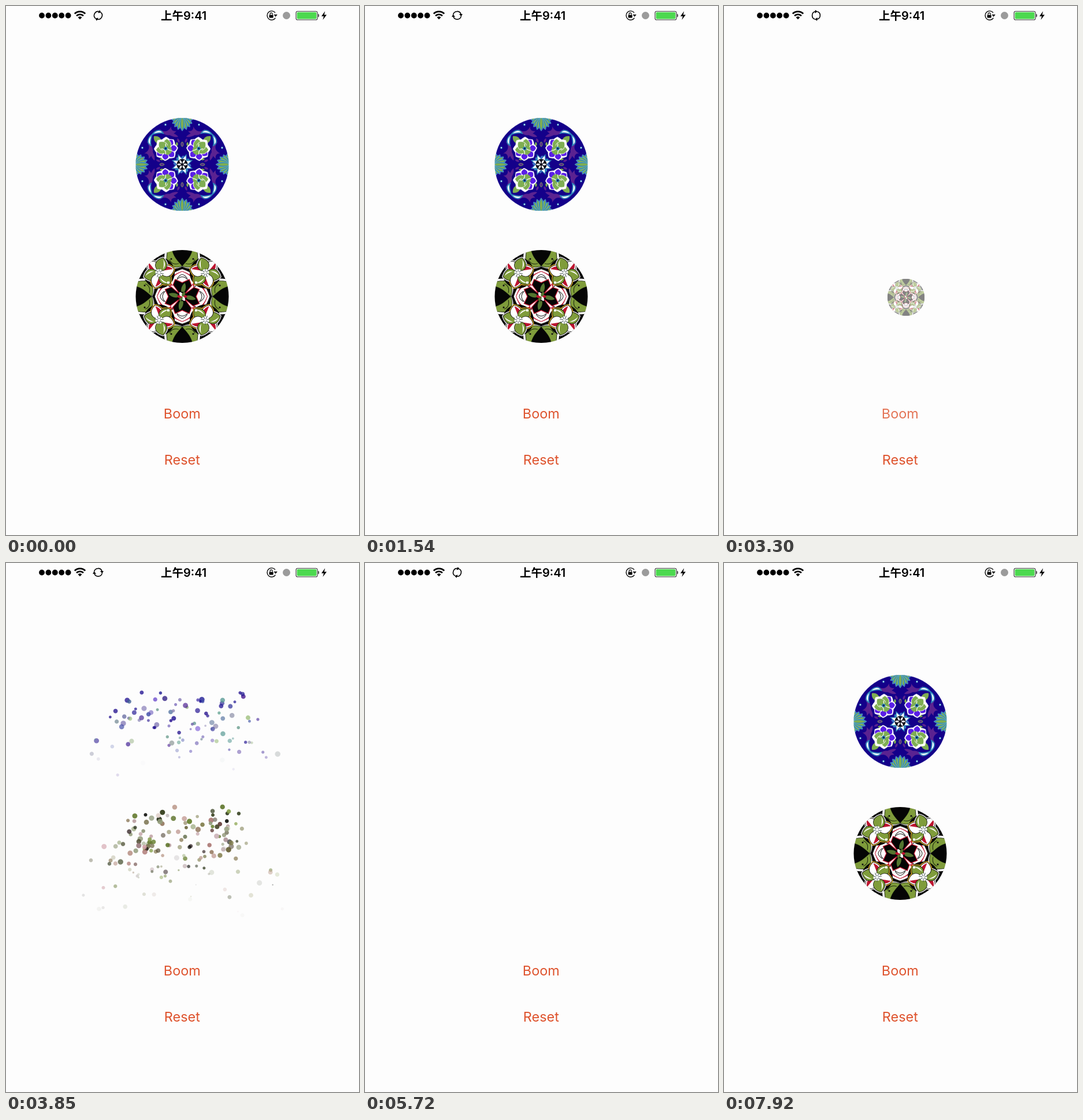
An HTML page with a canvas for the animation above (8 s loop, 611 px wide and 917 px high).

```html
<!DOCTYPE html>
<html lang="zh">
<head>
<meta charset="utf-8">
<title>Boom</title>
<style>
html, body { margin: 0; width: 100%; height: 100%; overflow: hidden; background: #fdfdfd; }
canvas, svg { position: absolute; left: 0; top: 0; width: 611px; height: 917px; }
.btn { font: 400 23.4px Inter, "Open Sans", sans-serif; fill: #de532d; text-anchor: middle; }
.time { font: 600 20px Inter, sans-serif; }
.cjk { font: 700 19.5px "Noto Sans CJK SC", "Noto Sans CJK", "Noto Sans CJK JP", sans-serif; }
</style>
</head>
<body>
<canvas id="stage" width="1222" height="1834"></canvas>
<svg viewBox="0 0 611 917">
  <g id="dots"></g>
  <g fill="none" stroke="#000" stroke-width="2.7">
    <path d="M118.8 13.4a13.2 13.2 0 0 1 18.4 0"/>
    <path d="M122 17a8.6 8.6 0 0 1 12 0"/>
  </g>
  <path d="M128 23.2l-3.4-3.5a4.9 4.9 0 0 1 6.8 0z"/>
  <g id="sync">
    <g id="arrow">
      <path d="M-6.9 -1.4A7 7 0 0 1 6.6 -2" fill="none" stroke="#000" stroke-width="1.6"/>
      <path d="M3.400 -2.400h6l-2.400 4.200z"/>
    </g>
    <use href="#arrow" transform="rotate(180)"/>
  </g>
  <text class="cjk" x="268" y="23.6">上午</text>
  <text class="time" x="307" y="23.6">9:41</text>
  <path d="M466 11.6a7.8 7.8 0 1 0 .4 9" fill="none" stroke="#000" stroke-width="1.4"/>
  <path d="M463.400 14.800h6.400l-3.200 4z"/>
  <rect x="455.600" y="15.4" width="7" height="5.200" rx=".8"/>
  <path d="M457.100 15.6v-1.8a2 2 0 0 1 4 0v1.8" fill="none" stroke="#000" stroke-width="1.2"/>
  <circle cx="485.5" cy="16.5" r="6.5" fill="#9b9b9b"/>
  <rect x="502" y="9.2" width="37" height="14.8" rx="2.8" fill="#fff" stroke="#333" stroke-width="1.1"/>
  <rect x="503.6" y="10.8" width="33.8" height="11.6" rx="1.6" fill="#4cd94f"/>
  <path d="M540.4 13.6c1.8.3 1.8 5.7 0 6z"/>
  <path d="M552.2 9l-6.2 8.7h4l-1.6 6.3 6.6-8.8h-4.2z"/>
  <text class="btn" id="boom" x="304.8" y="714.6">Boom</text>
  <text class="btn" id="reset" x="304.8" y="795.4">Reset</text>
</svg>
<script>
const LOOP = 8000, STEP = 110, SIZE = 161, GRID = 17, TAU = Math.PI * 2;
const $ = id => document.getElementById(id);
const clamp = v => Math.min(1, Math.max(0, v));
const stage = $('stage').getContext('2d');
stage.scale(2, 2);

$('dots').innerHTML = [0, 1, 2, 3, 4]
  .map(i => `<circle cx="${62 + i * 11.4}" cy="16.5" r="4.9"/>`).join('');

function random(seed) {
  return () => {
    seed = (seed * 1664525 + 1013904223) >>> 0;
    return seed / 4294967296;
  };
}

// Drawing helpers, all around the centre of a round picture
function shape(g, d, fill, line, width = 1) {
  const p = new Path2D(d);
  if (fill) { g.fillStyle = fill; g.fill(p); }
  if (line) { g.strokeStyle = line; g.lineWidth = width; g.stroke(p); }
}
function disc(g, x, y, r, fill) {
  g.fillStyle = fill;
  g.beginPath();
  g.arc(x, y, r, 0, TAU);
  g.fill();
}
function leaf(g, x, y, deg, len, w, fill, line, width) {
  g.save();
  g.translate(x, y);
  g.rotate(deg * Math.PI / 180);
  shape(g, `M0 0C${len * .2} ${-w * .7} ${len * .7} ${-w * .7} ${len} 0` +
           `C${len * .7} ${w * .7} ${len * .2} ${w * .7} 0 0Z`, fill, line, width);
  g.restore();
}
function star(g, n, outer, inner, turn, fill, line, width) {
  let d = '';
  for (let i = 0; i < n * 2; i++) {
    const a = (i / (n * 2)) * TAU + turn, r = i % 2 ? inner : outer;
    d += (i ? 'L' : 'M') + r * Math.cos(a) + ' ' + r * Math.sin(a);
  }
  shape(g, d + 'Z', fill, line, width);
}
function turns(g, n, draw) {
  for (let i = 0; i < n; i++) {
    g.save();
    g.rotate(i * TAU / n);
    draw(i);
    g.restore();
  }
}
function quarters(g, draw) {
  for (const sx of [1, -1]) for (const sy of [1, -1]) {
    g.save();
    g.scale(sx, sy);
    draw();
    g.restore();
  }
}
function eighths(g, draw) {
  quarters(g, () => {
    draw();
    g.transform(0, 1, 1, 0, 0, 0);
    draw();
  });
}
function picture(base, draw) {
  const c = document.createElement('canvas');
  c.width = c.height = SIZE * 2;
  const g = c.getContext('2d');
  g.scale(2, 2);
  g.translate(SIZE / 2, SIZE / 2);
  g.beginPath();
  g.arc(0, 0, SIZE / 2, 0, TAU);
  g.clip();
  disc(g, 0, 0, SIZE, base);
  draw(g);
  return c;
}

const blueArt = picture('#14008a', g => {
  const green = '#7fae52', teal = '#2d86bd', plum = '#5b2391', violet = '#5a1ee6';
  eighths(g, () => {
    shape(g, 'M10 58C20 46 34 50 40 62C32 55 24 56 19 66C20 60 16 57 10 58Z', plum);
    leaf(g, 7, 48, 20, 22, 5, plum);
    shape(g, 'M33 54C37 62 46 60 52 52C46 54 39 56 33 54Z', '#fff', teal, 1.8);
    disc(g, 29, 69, 1.9, teal);
    disc(g, 29, 69, 1, '#fff');
    leaf(g, 5, 38, 65, 8, 3.5, plum);
    leaf(g, 9, 32, 88, 7, 3.5, green);
  });
  turns(g, 4, () => {
    for (const i of [-4, 4, -3, 3, -2, 2, -1, 1, 0]) {
      const len = 23 - Math.abs(i) * 1.1;
      leaf(g, 0, -81, 90 + i * 20, len, 8, teal, '#7fc0d8', .5);
      leaf(g, 0, -81, 90 + i * 20, len - 2, 4.6, green);
    }
    leaf(g, 0, -39, 90, 8, 4, plum, green, .8);
  });
  quarters(g, () => {
    leaf(g, 37, 37, 45, 17, 10, green);
    g.translate(28, 27);
    g.rotate(Math.PI / 4);
    for (const a of [0, 45, -45, 85, -85, 130, -130, 180]) leaf(g, 0, 0, a, 21, 19, '#fff');
    for (const a of [80, -80, 130, -130, 180]) {
      const r = a * TAU / 360;
      leaf(g, 8 * Math.cos(r), 8 * Math.sin(r), a, 11, 10, violet);
    }
    for (const a of [45, -45, 0]) leaf(g, -2, 0, a, 19, 14, green, '#fff', .8);
    disc(g, -3, 0, 8, green);
    shape(g, 'M-9 5Q0 -2 7 6M-6 -7Q0 0 6 -6', null, '#fff', 1.2);
    disc(g, 1, 0, 3.2, teal);
    disc(g, 1, 0, 1.6, '#14204e');
  });
  star(g, 8, 18, 10, TAU / 16, '#fff', teal, 1.3);
  turns(g, 8, i => leaf(g, 10, 0, 22.5, 6, 4, i % 2 ? teal : '#3b6fc4'));
  disc(g, 0, 0, 9.5, '#0c0c1a');
  turns(g, 6, () => leaf(g, 2, 0, 0, 7, 3, '#fff'));
});

const redArt = picture('#050505', g => {
  const green = '#7f9c3b', moss = '#55752f', red = '#bd1430', gold = '#e3b52b';
  // Curved pairs on each axis
  turns(g, 4, () => {
    for (const s of [1, -1]) {
      g.save();
      g.scale(s, 1);
      shape(g, 'M20 -84C16 -70 8 -62 0 -52C14 -44 31 -50 31 -66C31 -74 29 -78 31 -84Z', '#fff');
      shape(g, 'M18 -84C16 -70 8 -62 0 -53C12 -47 28 -52 27 -66C27 -74 25 -78 26 -84Z', green, '#10180a', .8);
      disc(g, 19, -65, 1.5, '#111');
      shape(g, 'M6 -57Q18 -54 22 -64', null, '#10180a', .9);
      g.restore();
    }
  });
  // Pointed petals behind the central star
  turns(g, 4, () => {
    leaf(g, 8, 0, 0, 40, 52, '#fff', '#111', 1.2);
    leaf(g, 8, 0, 0, 36, 44, red);
    leaf(g, 10, 0, 0, 33, 36, '#fff');
    shape(g, 'M31 -9Q38 -4 38 0Q38 4 31 9M26 -12Q34 -6 34 0Q34 6 26 12', null, '#222', 1);
  });
  // Corner flowers, outward petal first
  quarters(g, () => {
    g.translate(40, -41);
    g.rotate(-Math.PI / 4);
    disc(g, 0, 0, 27, '#050505');
    turns(g, 6, i => leaf(g, 0, 0, 0, 28, 22, '#050505', i % 5 > 1 ? gold : '#fff', 1.6));
    turns(g, 6, i => {
      leaf(g, 2, 0, 0, 25, 19, i % 2 ? green : '#fff', '#050505', .8);
      if (i % 2) shape(g, 'M8 -5Q17 -9 24 -1Q17 -5 8 -5Z', '#fff');
      else shape(g, 'M7 2Q16 1 25 0Q17 11 7 6Z', red);
    });
    disc(g, 0, 0, 6.5, '#fff');
    turns(g, 7, () => shape(g, 'M2 0L8 1', null, '#344', .9));
    for (const s of [1, -1]) shape(g, `M29 ${s * 11}l7 ${s * 3}l-5 ${s * 5}z`, '#fff');
  });
  star(g, 8, 32, 24, TAU / 16, '#050505', red, 1.3);
  turns(g, 8, i => {
    if (i % 2) shape(g, 'M5 0L29 -2L25 3Z', '#fff', red, 1.2);
    else leaf(g, 5, 0, 14, 19, 7, moss);
  });
  quarters(g, () => shape(g, 'M22 22h4v4h-4z', '#fff'));
  disc(g, 0, 0, 8, '#0a0a0a');
  turns(g, 6, i => leaf(g, 0, 0, 0, 9, 5, [red, '#fff', moss][i % 3]));
});

// Burst particles take their colours from the shrunken picture
function burst(art, seed, keep, spread) {
  const c = document.createElement('canvas');
  c.width = c.height = GRID;
  const g = c.getContext('2d');
  g.imageSmoothingQuality = 'medium';
  g.drawImage(art, 0, 0, GRID, GRID);
  const px = g.getImageData(0, 0, GRID, GRID).data;
  const rnd = random(seed), list = [];
  for (let i = 0; i < GRID * GRID; i++) {
    const [r, gr, b, a] = px.slice(i * 4, i * 4 + 4);
    const part = {
      color: `rgb(${r},${gr},${b})`,
      endX: (rnd() * 2 - 1) * 1.15 * SIZE,
      topY: -(.25 + .95 * rnd()) * SIZE,
      endY: (.3 + .4 * rnd()) * SIZE,
      life: 350 + spread * rnd(),
      shrink: .85 * rnd()
    };
    if (a > 120 && rnd() < keep) list.push(part);
  }
  return list;
}

const balls = [
  { art: blueArt, x: 305, y: 274.7, shrinkAt: 3120, burstAt: 3310, dx: -6, dy: 4,
    parts: burst(blueArt, 71, .6, 650) },
  { art: redArt, x: 305, y: 503.5, shrinkAt: 3210, burstAt: 3380, dx: 10, dy: 1.5,
    parts: burst(redArt, 29, .8, 900) }
];
const SHAKE_AT = 3010, RESET_AT = 6820, FADE = 220, SHRINK = 150;

function drawPicture(b, t) {
  let scale = 1, alpha = 1, dx = 0, dy = 0;
  if (t >= SHAKE_AT && t < RESET_AT) {
    const k = clamp((t - b.shrinkAt) / SHRINK);
    if (k >= 1) return;
    scale = 1 - k;
    alpha = 1 - k * .85;
    const sway = Math.sin((t - SHAKE_AT) / 290 * Math.PI * 2.5);
    dx = b.dx * sway;
    dy = b.dy * sway;
  } else if (t >= RESET_AT) {
    alpha = clamp((t - RESET_AT) / FADE);
  }
  const s = SIZE * scale;
  stage.globalAlpha = alpha;
  stage.drawImage(b.art, b.x + dx - s / 2, b.y + dy - s / 2, s, s);
}

function drawBurst(b, t) {
  const age = t - b.burstAt;
  if (age < 0) return;
  for (const p of b.parts) {
    const k = age / p.life;
    if (k >= 1) continue;
    const m = 1 - Math.pow(1 - k, 1.25);
    const y = 2 * m * (1 - m) * p.topY + m * m * p.endY;
    stage.globalAlpha = 1 - Math.pow(k, 2.6);
    disc(stage, b.x + p.endX * m, b.y + y, SIZE / GRID / 2 * (1 - p.shrink * k), p.color);
  }
}

const pressed = (t, from, until) =>
  t < from ? 1 : t < until ? .2 : clamp(.2 + (t - until) / 330 * .8);

function render(time) {
  const t = Math.floor((time % LOOP) / STEP) * STEP;
  stage.clearRect(0, 0, 611, 917);
  for (const b of balls) {
    drawPicture(b, t);
    drawBurst(b, t);
  }
  stage.globalAlpha = 1;
  $('boom').style.opacity = pressed(t, 2900, 3050);
  $('reset').style.opacity = pressed(t, 6700, 6720);
  $('sync').style.display = t < 6490 ? '' : 'none';
  $('sync').setAttribute('transform', `translate(159.5 16.3) rotate(${(t - 1540) / 1155 * 180})`);
}

const start = performance.now();
function tick() {
  render(performance.now() - start);
  requestAnimationFrame(tick);
}
render(0);
requestAnimationFrame(tick);
</script>
</body>
</html>
```
